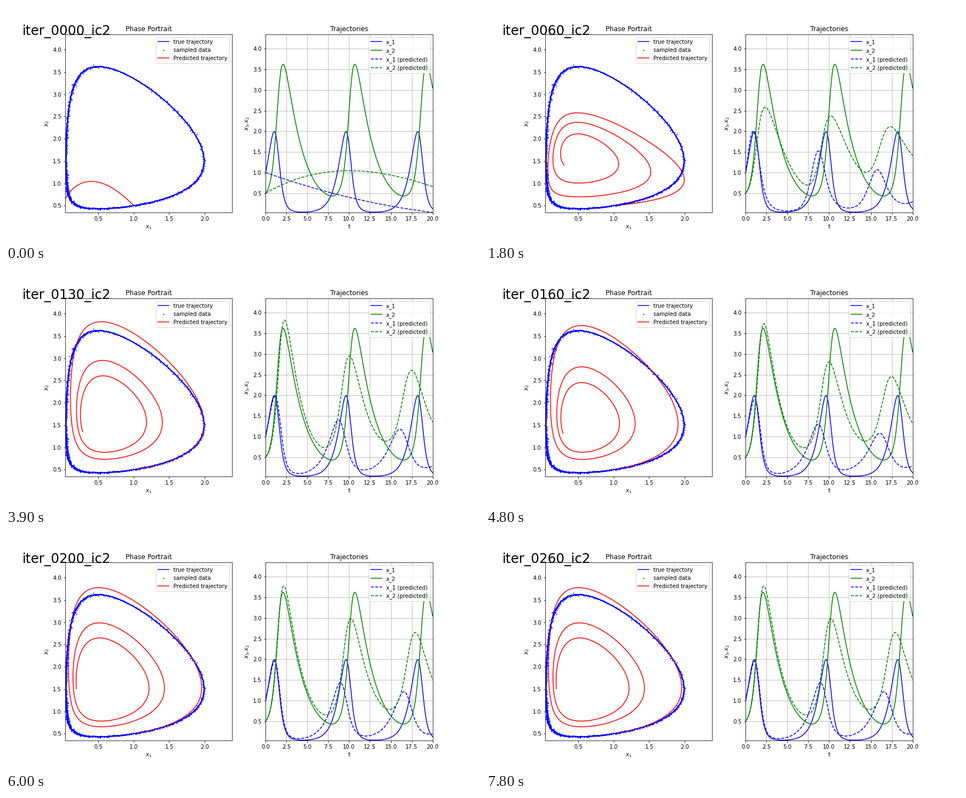
These frames come from a looping animation (864 by 432 pixels, 8 s). A matplotlib script:

```python
import numpy as np
import matplotlib.pyplot as plt
from matplotlib.animation import FuncAnimation

W, H, DPI = 864, 432, 72
STEP_MS, HOLD, FRAMES = 100, 3, 80
START = np.array([1.0, 0.5])
DT = 0.05
t = np.linspace(0, 20, 401)

# Model: (ln x)' = b (a + e x + q exp(-10 x) - y),  (ln y)' = d (x - c - f y)
TRUE_MODEL = np.array([1, 1, 1.5, 0, 0, 0.5, 0])        # b, d, a, e, q, c, f
FIRST_GUESS = np.array([0.97, 1.03, 1.52, 0, 1.2, 0.51, 0.01])
SPREAD = np.array([0.2, 0.2, 0.15, 0.1, 1.0, 0.06, 0.03])

# Points (t, x, y) on the learned orbit: x peak, y peak, x trough, next y peak, end
LANDMARKS = {
    60: [(1.05, 1.41, 1.45), (2.5, .567, 2.835), (4.5, .055, 1.47), (10.1, .56, 2.29), (20, .326, 1.28)],
    100: [(1.25, 2.02, 1.85), (2.3, .66, 4.0), (4.5, .113, 1.91), (10.1, .575, 2.8), (20, .26, 1.35)],
    160: [(1.1, 1.95, 1.6), (2.2, .55, 3.73), (3.9, .108, 2.1), (10.0, .52, 2.68), (20, .272, 1.325)],
    200: [(1.1, 1.995, 1.56), (2.15, .52, 3.74), (3.8, .08, 2.2), (10.2, .512, 2.965), (20, .187, 1.52)],
}


def flow(z, params):
    b, d, a, e, q, c, f = params
    x, y = np.exp(np.clip(z, -8, 2))
    return np.array([b * (a + e * x + q * np.exp(-10 * x) - y), d * (x - c - f * y)])


def integrate(params):
    """Log orbit for a batch of models, by Runge-Kutta; shape (time, 2, batch...)."""
    z = np.multiply.outer(np.log(START), np.ones(params.shape[1:]))
    path = [z]
    for _ in t[1:]:
        k1 = flow(z, params)
        k2 = flow(z + DT / 2 * k1, params)
        k3 = flow(z + DT / 2 * k2, params)
        k4 = flow(z + DT * k3, params)
        z = z + DT / 6 * (k1 + 2 * k2 + 2 * k3 + k4)
        path.append(z)
    return np.array(path)


def fit_models(points, rounds=22, eps=1e-3):
    """Damped least squares through the landmarks, all stages at once."""
    stages = np.arange(len(points))
    index = np.rint(points[..., 0] / DT).astype(int)
    goal = np.log(points[..., 1:])[..., None]
    size = len(FIRST_GUESS)

    def residuals(offsets):
        path = integrate(np.moveaxis(FIRST_GUESS + SPREAD * offsets, -1, 0))
        miss = path[index, :, stages[:, None]] - goal
        miss = miss.reshape(len(stages), -1, offsets.shape[1])
        return np.concatenate([miss, 0.03 * offsets.transpose(0, 2, 1)], axis=1)

    best = np.zeros((len(stages), size))
    probes = eps * np.vstack([np.zeros(size), np.eye(size)])
    for _ in range(rounds):
        r = residuals(best[:, None] + probes)
        base = r[..., :1]
        jac = (r[..., 1:] - base) / eps
        jac_t = jac.transpose(0, 2, 1)
        steps = [-np.linalg.solve(jac_t @ jac + damp * np.eye(size), jac_t @ base)[..., 0]
                 for damp in (1e-3, 0.1, 1, 10, 100)]
        trials = best[:, None] + np.stack([0 * best, *steps], axis=1)
        cost = (residuals(trials) ** 2).sum(axis=1)
        best = trials[stages, cost.argmin(axis=1)]
    return FIRST_GUESS + SPREAD * best


def untrained():
    return np.array([1 - .07175 * t + .001175 * t**2,
                     .5 + .117 * t - .00705 * t**2 + .00008 * t**3])


iterations = 10 * np.arange(-(-FRAMES // HOLD))
stage_iters = list(LANDMARKS)
stage_models = fit_models(np.array(list(LANDMARKS.values())))
models = np.array([np.interp(iterations, stage_iters, p) for p in stage_models.T])
orbits = np.exp(integrate(models))


def predict(step):
    x, y = orbits[..., step].T
    w = min(1, iterations[step] / stage_iters[0])
    slow = t * (0.4 + 0.6 * w)
    learned = np.array([np.interp(slow, t, x), np.interp(slow, t, y)])
    return untrained() ** (1 - w) * learned ** w


true = np.exp(integrate(TRUE_MODEL)).T
rng = np.random.default_rng(3)
sample_t = np.linspace(0, 20, 1000)
samples = np.array([np.interp(sample_t, t, c) for c in true])
samples += rng.normal(0, 0.01, samples.shape)
low, high = 0.8 * true.min(axis=1), 1.2 * true.max(axis=1)

fig, (phase, series) = plt.subplots(1, 2, figsize=(W / DPI, H / DPI), dpi=DPI)
fig.subplots_adjust(left=0.125, right=0.9, bottom=0.125, top=0.88, wspace=0.2)
heading = fig.text(30.2 / W, 379 / H, "", fontsize=24)

phase.plot(*true, "b-", label="true trajectory")
phase.scatter(*samples, s=1, c="b", linewidths=1, zorder=2.2, label="sampled data")
orbit, = phase.plot([], [], "r-", zorder=2.1, label="Predicted trajectory")
phase.set(title="Phase Portrait", xlabel="$x_1$", ylabel="$x_2$",
          xlim=(low[0], high[0]), ylim=(low[1], high[1]),
          xticks=np.arange(0.5, 2.1, 0.5), yticks=np.arange(0.5, 4.1, 0.5))
phase.legend(loc="upper right")

series.plot(t, true[0], "b-", label="x_1")
series.plot(t, true[1], "g-", label="x_2")
x_line, = series.plot([], [], "b--", label="x_1 (predicted)")
y_line, = series.plot([], [], "g--", label="x_2 (predicted)")
series.set(title="Trajectories", xlabel="t", ylabel="$x_1$,$x_2$",
           xlim=(0, 20), ylim=(low[0], high[1]),
           xticks=np.arange(0, 20.1, 2.5), yticks=np.arange(0.5, 4.1, 0.5))
series.grid(True)
series.legend(loc="upper right")


def update(frame):
    step = frame // HOLD
    x, y = predict(step)
    heading.set_text(f"iter_{iterations[step]:04d}_ic2")
    orbit.set_data(x, y)
    x_line.set_data(t, x)
    y_line.set_data(t, y)
    return heading, orbit, x_line, y_line


anim = FuncAnimation(fig, update, frames=FRAMES, interval=STEP_MS,
                     repeat=True, repeat_delay=0)
plt.show()
```
